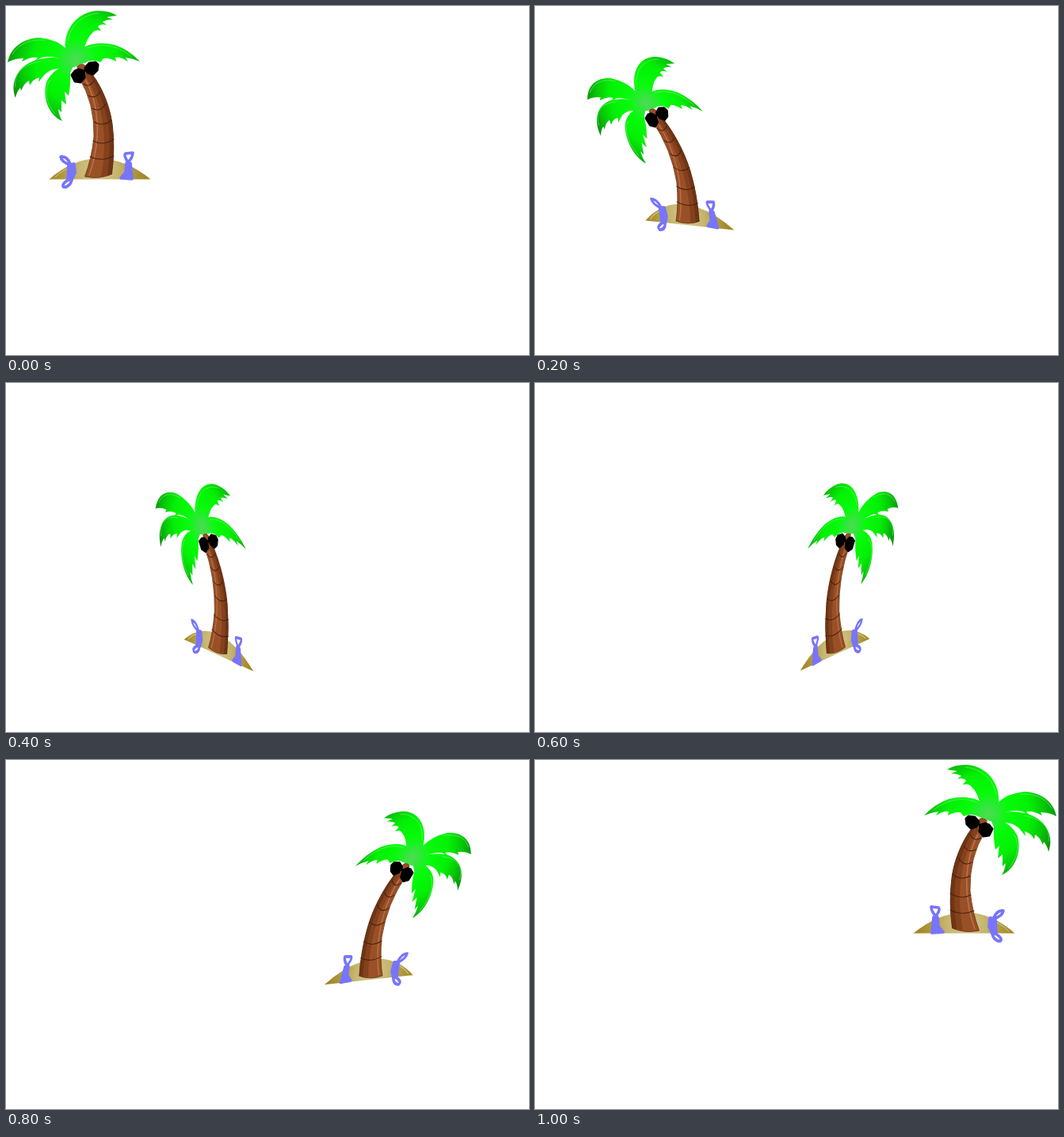
Write an HTML page that moves like this. It is 660 by 440 pixels and loops after 1.2 s.

```html
<!DOCTYPE html>
<html lang="en">
<head>
<meta charset="utf-8">
<title>Dancing palm</title>
<style>
  html, body { margin: 0; width: 100%; height: 100%; overflow: hidden; background: #fff; }
  svg { display: block; width: 100vw; height: 100vh; }
</style>
</head>
<body>
<svg viewBox="0 0 660 440">
  <defs>
    <radialGradient id="leaf" gradientUnits="userSpaceOnUse" cx="88" cy="68" r="88">
      <stop offset="0" stop-color="#50d955"/>
      <stop offset=".14" stop-color="#2de838"/>
      <stop offset=".3" stop-color="#06fb0a"/>
      <stop offset=".6" stop-color="#03f005"/>
      <stop offset=".8" stop-color="#06c808"/>
      <stop offset="1" stop-color="#0a920c"/>
    </radialGradient>
    <radialGradient id="sand" gradientUnits="userSpaceOnUse" cx="116" cy="208" r="62">
      <stop offset="0" stop-color="#d6ca94"/>
      <stop offset=".4" stop-color="#c5b56e"/>
      <stop offset=".75" stop-color="#ad963c"/>
      <stop offset="1" stop-color="#a08520"/>
    </radialGradient>
  </defs>

  <g id="palm" stroke-linecap="round" stroke-linejoin="round">
    <path fill="url(#sand)" d="M54.500 218.500Q83 193 116 192Q152 193 182.500 218.500Z"/>
    <path fill="none" stroke="#d6c77f" d="M62 216Q72 206 82 203"/>

    <path fill="#9a5027" stroke="#63300f" stroke-width=".8"
      d="M90 76Q97 69 104 80C117 95 130 120 134 148Q138 178 133.500 212Q117 219 99.500 215Q108 193 111 165Q112 122 92 90Z"/>
    <path fill="#5a270d" opacity=".35"
      d="M104 80C117 95 130 120 134 148Q138 178 133.500 212L120 215Q127 180 122 145Q117 113 100 88Z"/>
    <path fill="#4a1f09" opacity=".35"
      d="M104 80C117 95 130 120 134 148Q138 178 133.500 212L128 214Q133 178 129 147Q122 113 104 84Z"/>
    <path fill="none" stroke="#c47b50" stroke-width="1.600" opacity=".8"
      d="M101 94Q117 124 115 165Q113 192 105 213"/>
    <path fill="none" stroke="#4b210b" stroke-width="1.100"
      d="M97 98Q105 104 111 94M104 113Q113 118 119 108M109 129Q119 135 126 123M111 146Q122 153 133 144M110 170Q122 177 136 168M106 190Q121 197 136 189"/>

    <g fill="url(#leaf)">
      <path d="M75 56C72 28 92 6 117 6Q131 6 140 12L127 14L135 17Q127 17 122 20L127 24Q119 22 116 26L120 31Q112 29 109 34Q102 40 98 56L88 72Z"/>
      <path d="M2 71C6 50 25 40 43 40Q64 42 76 54L92 70L73 68Q57 62 45 65L37 69L40 65Q31 64 20 70L22 66Q11 66 2 71Z"/>
      <path d="M12 116C4 95 16 73 42 67Q60 63 76 67L92 68L74 79Q59 77 49 86L41 96L42 90Q34 92 30 100L29 94Q23 97 19 107L18 103Q13 109 12 116Z"/>
      <path d="M71 145C52 137 45 111 52 94Q59 81 74 75L90 66L81 84Q82 98 79 113L74 108L76 124L70 119L70 134L66 130Q67 139 71 145Z"/>
      <path d="M86 62C96 48 117 44 137 49Q155 55 169 70Q160 66 151 65L154 70Q145 64 138 65L139 70Q130 65 123 66L119 71Q109 66 99 72L86 76Z"/>
      <circle cx="85" cy="67" r="10"/>
    </g>
    <path fill="none" stroke="#8cf08c" stroke-width=".9" opacity=".6"
      d="M78 44C81 25 96 11 117 9M8 61C17 46 32 42 48 43M12 102C9 85 22 73 43 70M62 136C49 121 48 104 56 93M103 53C118 47 139 48 157 63"/>

    <g stroke="#000" stroke-width="3">
      <path d="M83 87L87 82L92 80L98 82L99 90L94 96L87 95Z"/>
      <path d="M100 78L105 72L113 71L116 74L115 81L110 86L103 84Z"/>
      <path d="M96 83L102 80"/>
    </g>

    <g fill="none" stroke="#7775fb" stroke-width="3.600">
      <path d="M81 200Q70 197 69 190Q77 189 81 199M79 219Q69 225 73 228.500Q81 228 83 219"/>
      <path fill="#7775fb" d="M79 200L86 199L87 210L83 219L78 219Z"/>
      <path d="M154 197Q148 188 151 186L160 185Q160 191 154 197"/>
      <path fill="#7775fb" d="M152 198L157 198L159 218L145 217L151 210Z"/>
    </g>
  </g>
</svg>
<script>
  const palm = document.getElementById("palm");
  const hold = 200;

  // Three poses [a, b, c, d, e, f] going down, then mirrored going back up.
  const down = [
    [1, 0, 0, 1, 0, 0],
    [0.875, 0.0945, 0.184, 0.998, 51.4, 47.2],
    [0.685, 0.315, 0, 1.005, 187.3, 86.4]
  ];
  const mirror = ([a, b, c, d, e, f], width, dy) => [-a, b, -c, d, width - e, f + dy];
  const poses = [
    ...down,
    mirror(down[2], 647, -0.7),
    mirror(down[1], 653, 0.8),
    mirror(down[0], 660, 0)
  ];

  function draw(now) {
    const step = Math.floor(now / hold) % poses.length;
    palm.setAttribute("transform", `matrix(${poses[step]})`);
    requestAnimationFrame(draw);
  }
  draw(performance.now());
</script>
</body>
</html>
```
